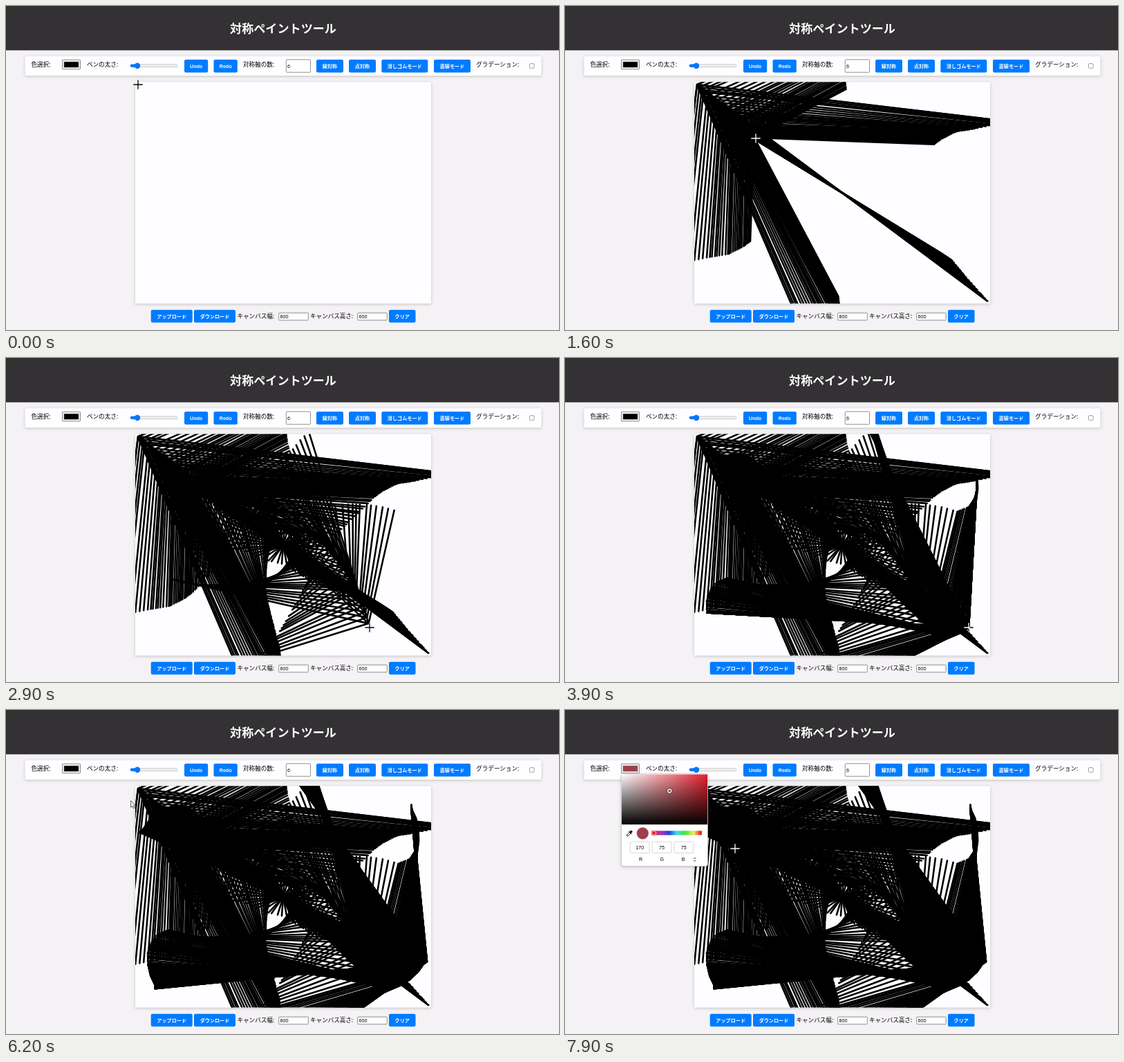
An HTML page with a canvas for the animation above (8 s loop, 800 by 470 pixels).

```html
<!DOCTYPE html>
<html lang="ja">
<head>
<meta charset="utf-8">
<title>対称ペイントツール</title>
<style>
  html, body { margin: 0; width: 800px; height: 470px; overflow: hidden; background: #f4f2f4; }
  svg, canvas { position: absolute; left: 0; top: 0; display: block; }
  text { font-family: "Noto Sans CJK JP", "Noto Sans CJK", sans-serif; font-size: 8.56px; fill: #000; }
  .title { font-size: 17.1px; font-weight: 700; fill: #fff; text-anchor: middle; }
  .btn { font-size: 7.13px; font-weight: 700; fill: #fff; text-anchor: middle; }
  .latin { font-family: "Liberation Sans", Arial, sans-serif; }
  .val { font-family: "Liberation Sans", Arial, sans-serif; font-size: 7.13px; }
  .mid { text-anchor: middle; }
  .shadow { filter: drop-shadow(0 1px 2px rgba(0,0,0,.2)); }
  #cross { mix-blend-mode: difference; }
</style>
</head>
<body>
<svg id="page" width="800" height="470">
  <rect width="800" height="64.3" fill="#333133"/>
  <text class="title" x="401" y="39">対称ペイントツール</text>
  <rect class="shadow" x="27.5" y="73" width="747" height="28" rx="2.5" fill="#fefdff"/>
  <rect class="shadow" x="187" y="110.3" width="428" height="321.3" fill="#fefdff"/>
  <rect x="81.5" y="78" width="26" height="13.7" rx=".8" fill="#efefef" stroke="#767676" stroke-width=".8"/>
  <rect id="swatch" x="84" y="81" width="21" height="8" stroke="#777" stroke-width=".5"/>
  <rect x="180" y="84.7" width="68" height="4" rx="2" fill="#efefef" stroke="#b2b2b2" stroke-width=".6"/>
  <rect x="179.8" y="84.5" width="11" height="4.3" rx="2" fill="#0075ff"/>
  <circle cx="190" cy="86.7" r="4.2" fill="#0075ff"/>
  <rect x="757.4" y="83.6" width="6.6" height="6.6" rx="1.3" fill="#fff" stroke="#767676" stroke-width=".7"/>
</svg>
<canvas id="art" width="800" height="470"></canvas>
<svg width="800" height="470">
  <defs>
    <linearGradient id="sat"><stop stop-color="#fff"/><stop offset="1" stop-color="#e5202f"/></linearGradient>
    <linearGradient id="dark" x2="0" y2="1"><stop stop-opacity="0"/><stop offset="1"/></linearGradient>
    <linearGradient id="hue">
      <stop offset=".05" stop-color="#ee2233"/><stop offset=".19" stop-color="#b030c0"/>
      <stop offset=".35" stop-color="#2440e0"/><stop offset=".5" stop-color="#40d8f0"/>
      <stop offset=".67" stop-color="#40ea30"/><stop offset=".84" stop-color="#f0ea60"/>
      <stop offset=".97" stop-color="#ee2233"/>
    </linearGradient>
    <clipPath id="field"><rect x="82" y="93.3" width="124" height="73"/></clipPath>
  </defs>
  <g id="picker">
    <rect class="shadow" x="81.6" y="92.8" width="124.8" height="133.7" rx="3" fill="#fff" stroke="#c4c2c4" stroke-width=".8"/>
    <g clip-path="url(#field)">
      <rect x="82" y="93.3" width="124" height="73" fill="url(#sat)"/>
      <rect x="82" y="93.3" width="124" height="73" fill="url(#dark)"/>
      <g id="marker" fill="none">
        <circle r="3.6" stroke="#000" stroke-width="1"/>
        <circle r="2.7" stroke="#fff" stroke-width="1.3"/>
      </g>
    </g>
    <g transform="translate(93 179.3) rotate(45)">
      <path d="M-1.5-5.5h3v3.2h-3zM-2.6-2.4h5.2v1.3h-5.2z" fill="#111"/>
      <path d="M-1.2-1v4.3L0 4.8l1.2-1.5V-1" fill="none" stroke="#111" stroke-width=".9"/>
    </g>
    <circle id="chip" cx="112.3" cy="178.8" r="8.6" stroke="#bbb" stroke-width=".4"/>
    <rect x="125" y="175.2" width="73" height="6.4" rx="1" fill="url(#hue)"/>
    <circle cx="128.6" cy="178.4" r="3.2" fill="#ee2233" stroke="#fff" stroke-width="1"/>
    <circle cx="128.6" cy="178.4" r="3.9" fill="none" stroke="#a33" stroke-width=".5"/>
    <g id="rgb"></g>
    <path d="M186 216l1.6-1.9 1.6 1.9M186 217.7l1.6 1.9 1.6-1.9" fill="none" stroke="#222" stroke-width=".8"/>
  </g>
  <path id="arrow" d="M0 0v9.6l2.2-2 1.5 3.5 1.7-.7-1.5-3.4H7z" fill="#fff" stroke="#333" stroke-width=".8"/>
</svg>
<svg id="cross" width="800" height="470">
  <path id="plus" d="M-6.7 0H6.7M0-6.7V6.7" stroke="#fff" stroke-width="1.3"/>
</svg>
<script>
const $ = id => document.getElementById(id);

function add(parent, tag, attrs, label) {
  const el = document.createElementNS('http://www.w3.org/2000/svg', tag);
  for (const k in attrs) el.setAttribute(k, attrs[k]);
  if (label !== undefined) el.textContent = label;
  parent.append(el);
  return el;
}

function button(x, y, w, label) {
  add($('page'), 'rect', { x, y, width: w, height: 18.6, rx: 2.2, fill: '#007bff' });
  add($('page'), 'text', { class: /^[A-Z]/.test(label) ? 'btn latin' : 'btn', x: x + w / 2, y: y + 12 }, label);
}

function field(x, y, w, h, value) {
  add($('page'), 'rect', { x, y, width: w, height: h, rx: 1, fill: '#fff', stroke: '#767676', 'stroke-width': .8 });
  add($('page'), 'text', { class: 'val', x: x + 1.8, y: y + h / 2 + 2.6 }, value);
}

[[258, 34.2, 'Undo'], [300.5, 34.3, 'Redo'], [449, 39, '線対称'], [496, 39, '点対称'],
 [543.3, 67, '消しゴムモード'], [619, 53, '直線モード']].forEach(([x, w, s]) => button(x, 77.8, w, s));
[[209.7, 60, 'アップロード'], [272, 60, 'ダウンロード'], [554, 38.5, 'クリア']]
  .forEach(([x, w, s]) => button(x, 440.7, w, s));
[[36.5, 88, '色選択:'], [117, 88, 'ペンの太さ:'], [343, 88, '対称軸の数:'], [680.3, 88, 'グラデーション:'],
 [334.5, 453, 'キャンバス幅:'], [440, 453, 'キャンバス高さ:']]
  .forEach(([x, y, s]) => add($('page'), 'text', { x, y }, s));
field(405.3, 77.8, 35.2, 18.4, '6');
field(394.7, 445.2, 42.6, 10.6, '800');
field(508.7, 445.2, 42.6, 10.6, '600');

const channels = [...'RGB'].map((name, i) => {
  const x = 94.3 + i * 31.8;
  add($('rgb'), 'rect', { x, y: 191.2, width: 27.8, height: 16.2, rx: 1, fill: '#fff', stroke: '#cfcfcf', 'stroke-width': .8 });
  add($('rgb'), 'text', { class: 'val mid', x: 109.5 + i * 30.8, y: 219 }, name);
  return add($('rgb'), 'text', { class: 'val mid', x: x + 13.9, y: 202 }, '0');
});

// Pointer path: time, x, y
const LOOP = 8000, STEP = 100, DOWN = 800, UP = 5500, OPEN = 6500, PICK = 7500;
const path = [
  [0, 191, 114], [820, 191, 114], [1030, 224, 151], [1220, 242, 173], [1430, 262, 186], [1600, 276, 192],
  [1680, 288, 195], [2010, 349, 212], [2150, 380, 230], [2240, 401, 243], [2320, 422, 248],
  [2420, 450, 258], [2480, 466, 268], [2590, 484, 298], [2685, 500, 325], [2760, 511, 345],
  [2830, 520, 367], [2900, 526, 391], [3060, 540, 402], [3220, 554, 403], [3420, 570, 400],
  [3600, 584, 391], [3900, 584, 391], [4500, 596, 380], [5100, 605, 367], [5400, 609, 365], [5700, 609, 365],
  [6300, 95, 85], [6600, 95, 85], [7000, 113, 103], [7200, 115, 105], [7500, 151, 117],
  [7600, 151, 117], [7900, 246, 201], [8000, 246, 201]
];

function pointer(t) {
  const i = Math.max(1, path.findIndex(p => p[0] >= t));
  const [t0, x0, y0] = path[i - 1], [t1, x1, y1] = path[i];
  const k = (t - t0) / (t1 - t0);
  return [x0 + (x1 - x0) * k, y0 + (y1 - y0) * k];
}

// Uneven mouse events while the button is held
let seed = 11;
const random = () => (seed = (seed * 16807) % 2147483647) / 2147483647;
const events = [];
for (let t = DOWN; t < UP; t += 16 + random() * 20) events.push([t, ...pointer(t)]);

const ctx = $('art').getContext('2d');
const CX = 401, CY = 271, AXES = 6;

function rays(x, y) {
  const dx = x - CX, dy = y - CY;
  for (let i = 0; i < AXES; i++) {
    const a = i * 2 * Math.PI / AXES, c = Math.cos(a), s = Math.sin(a);
    ctx.moveTo(x, y);
    ctx.lineTo(CX + dx * c - dy * s, CY + dx * s + dy * c);
  }
}

function paint(t) {
  ctx.clearRect(0, 0, 800, 470);
  ctx.save();
  ctx.beginPath();
  ctx.rect(187, 110.3, 428, 321.3);
  ctx.clip();
  ctx.lineWidth = 2.6;
  ctx.lineCap = 'round';
  for (const [at, x, y] of events) {
    if (at > t) break;
    ctx.beginPath();
    rays(x, y);
    ctx.stroke();
  }
  ctx.restore();
}

function show(t) {
  paint(t);
  const [x, y] = pointer(t), open = t >= OPEN, picked = t >= PICK;
  const overPicker = open && x < 207 && y < 227;
  const onCanvas = x > 186 && x < 616 && y > 110 && y < 432 && !overPicker;
  const place = `translate(${x} ${y})`;
  $('plus').setAttribute('transform', place);
  $('arrow').setAttribute('transform', place);
  $('plus').style.display = onCanvas ? '' : 'none';
  $('arrow').style.display = onCanvas || (picked && x < 152) ? 'none' : '';
  $('picker').style.display = open ? '' : 'none';
  $('marker').setAttribute('transform', picked ? 'translate(151.3 117.3)' : 'translate(82 166)');
  const color = picked ? '#a03e49' : '#000';
  $('swatch').setAttribute('fill', color);
  $('chip').setAttribute('fill', color);
  channels.forEach((el, i) => { el.textContent = picked ? [170, 75, 75][i] : 0; });
}

const start = performance.now();
let last = -1;
function tick() {
  const t = Math.floor((performance.now() - start) % LOOP / STEP) * STEP;
  if (t !== last) show(last = t);
  requestAnimationFrame(tick);
}
tick();
</script>
</body>
</html>
```
